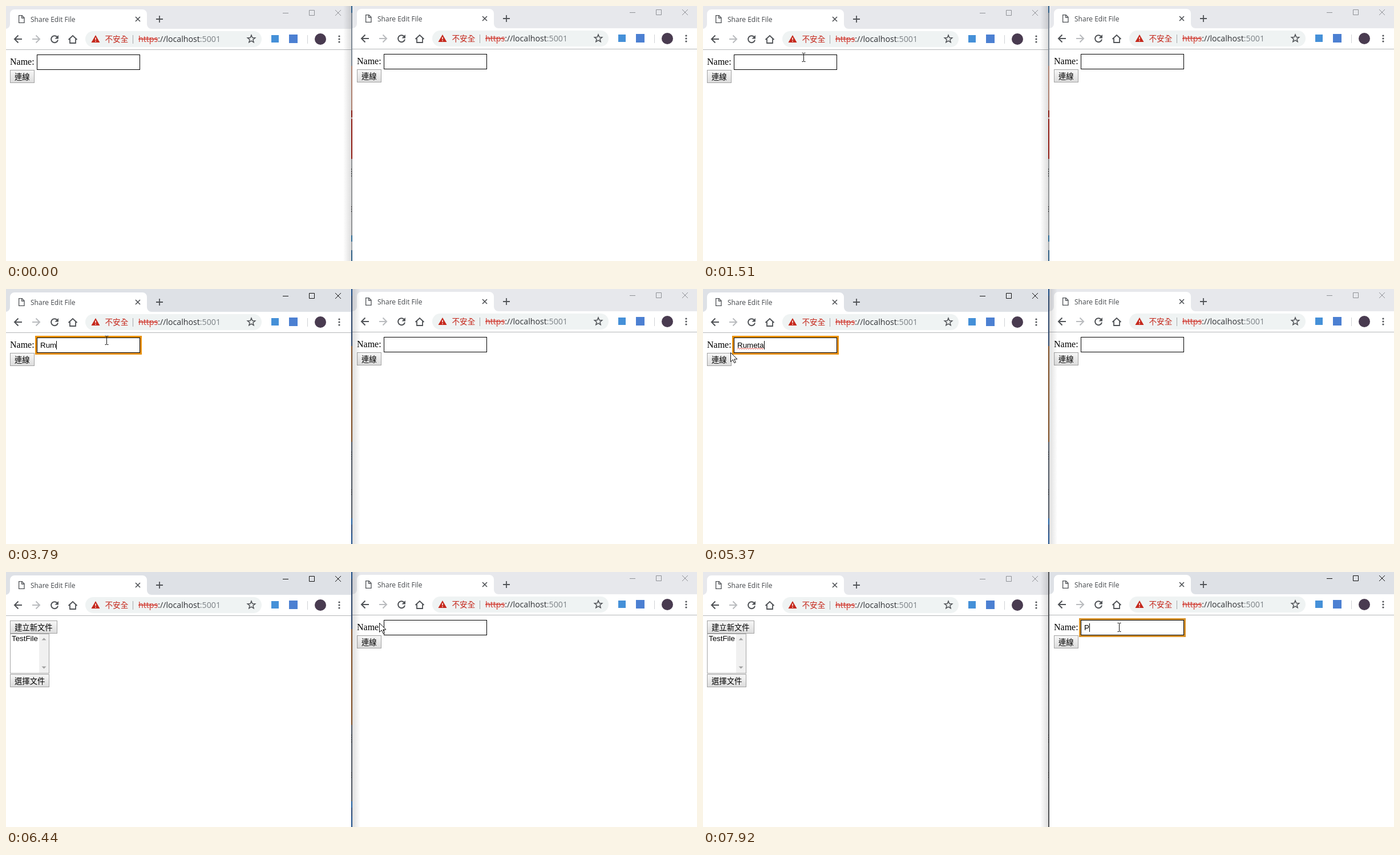
An HTML page for the animation above (8 s loop, 1211 by 447 pixels).

```html
<!DOCTYPE html>
<html lang="zh-Hant">
<head>
<meta charset="utf-8">
<title>Share Edit File</title>
<style>
html, body { margin: 0; width: 100%; height: 100%; overflow: hidden; background: #fff; }
svg { display: block; }
.win { --strip: #e7e8ec; --ctl: #8f9196; }
.win.active { --strip: #dee1e6; --ctl: #111; }
.line { fill: none; stroke: #505357; stroke-width: 2; }
.ui { font-family: "Open Sans", "Noto Sans", sans-serif; }
.cjk { font-family: "Noto Sans CJK TC", "Noto Sans CJK JP", "Noto Sans CJK", sans-serif; font-size: 13.333px; }
.form { font-family: "Liberation Sans", "Noto Sans CJK TC", "Noto Sans CJK JP", Arial, sans-serif; font-size: 13.333px; }
.btn { fill: url(#face); stroke: #a2a2a2; }
</style>
</head>
<body>
<svg width="1211" height="447" viewBox="0 0 1211 447">
  <defs>
    <linearGradient id="face" x2="0" y2="1">
      <stop stop-color="#f7f7f7"/><stop offset="1" stop-color="#dcdcdc"/>
    </linearGradient>
    <linearGradient id="shade">
      <stop stop-color="#000" stop-opacity="0"/><stop offset="1" stop-color="#000" stop-opacity=".13"/>
    </linearGradient>

    <g id="browser">
      <path d="M-1 0H604V449H-1z" fill="#fff"/>
      <path d="M-1 0H605V40H-1z" fill="var(--strip)"/>
      <path d="M-1 40a8 8 0 0 0 8-8V14a8 8 0 0 1 8-8H239a8 8 0 0 1 8 8V32a8 8 0 0 0 8 8z" fill="#fff"/>
      <path d="M-1 40H605V76H-1z" fill="#fff"/>
      <path d="M-1 76.5H605" stroke="#b4b6b9"/>
      <path class="line" style="stroke-width:1.3" d="M22.6 16.6h5.4l4 4v8.8h-9.4zM27.6 16.6v4.4h4.4"/>
      <text class="ui" x="43" y="28" font-size="12" fill="#45484c">Share Edit File</text>
      <path class="line" style="stroke-width:1.7" d="M227 19l8 8m0-8l-8 8"/>
      <path class="line" style="stroke-width:1.8" d="M263 23h12M269 17v12"/>
      <g fill="none" stroke="var(--ctl)">
        <path d="M485 12.5h10M531.5 7.5h9v9h-9zM577 7l10 10m0-10l-10 10"/>
      </g>
      <path class="line" d="M28 58H15M21.5 51.5L15 58l6.5 6.5"/>
      <path class="line" style="stroke:#b9bbbe" d="M46 58h13M52.500 51.500L59 58l-6.500 6.500"/>
      <path class="line" d="M89.500 54A6 6 0 1 0 91 59.500"/>
      <path fill="#505357" d="M92 51v6.500h-6.500z"/>
      <path class="line" style="stroke-width:1.800" d="M109.500 59L117 52l7.500 7M112 57.500V65h10v-7.500"/>
      <rect x="139" y="44" width="309" height="28" rx="14" fill="#eff3f3"/>
      <path fill="#c5281c" d="M157 51l7.500 13h-15z"/>
      <path stroke="#fff" stroke-width="1.500" d="M157 55.500v4M157 61v1.500"/>
      <text class="cjk" x="173.500" y="63" style="font-size:13.600px" font-weight="300" fill="#c5281c">不安全</text>
      <path stroke="#a5a8ab" d="M222.500 51v15"/>
      <text class="ui" x="232" y="63" font-size="14.200" fill="#303236"><tspan fill="#d0342a" text-decoration="line-through">https</tspan>://localhost<tspan fill="#7b8085">:5001</tspan></text>
      <path class="line" style="stroke-width:1.500" d="M430 51l1.800 4.600 4.900.3-3.800 3.100 1.200 4.700-4.100-2.600-4.100 2.600 1.200-4.700-3.800-3.100 4.900-.3z"/>
      <rect x="465" y="51" width="13" height="13" fill="#4590d8"/>
      <rect x="496" y="50" width="15" height="15" fill="#4c80d2"/>
      <path stroke="#cfd2d5" d="M528.500 51v15"/>
      <circle cx="551" cy="58" r="10" fill="#493b50"/>
      <g fill="#505357">
        <circle cx="584" cy="53" r="1.600"/><circle cx="584" cy="58" r="1.600"/><circle cx="584" cy="63" r="1.600"/>
      </g>
    </g>

    <g id="login">
      <text x="7" y="103" font-family="Liberation Serif, Times, serif" font-size="16">Name:</text>
      <rect x="54.500" y="85.500" width="180" height="26" fill="#fff" stroke="#000"/>
      <rect class="btn" x="7.500" y="112.500" width="42" height="22"/>
      <text class="cjk" x="15" y="128.500">連線</text>
    </g>
  </defs>

  <use id="winL" class="win" href="#browser"/>
  <use id="winR" class="win" href="#browser" x="608" y="-1"/>

  <g id="files">
    <rect class="btn" x="7.500" y="85.500" width="82" height="22"/>
    <text class="cjk" x="15" y="101.500">建立新文件</text>
    <rect x="7.500" y="108.500" width="68" height="69" fill="#fff" stroke="#a5a5a5"/>
    <path fill="#f0f0f0" d="M58 109h17v68H58z"/>
    <path fill="#a0a0a0" d="M62.500 119.500h8l-4-4zM62.500 165.500h8l-4 4z"/>
    <text class="form" x="10" y="121">TestFile</text>
    <rect class="btn" x="7.500" y="179.500" width="68" height="22"/>
    <text class="cjk" x="15" y="195.500">選擇文件</text>
  </g>

  <g id="loginL">
    <use href="#login"/>
    <rect id="press" x="7.500" y="112.500" width="42" height="22" fill="#000" fill-opacity=".08" stroke="#888"/>
    <rect class="ring" x="52.500" y="83.500" width="184" height="30" fill="none" stroke="#e8910c" stroke-width="3"/>
    <text class="form" x="60" y="103"></text>
    <rect class="caret" y="91" width="1" height="15"/>
    <path id="compose" d="M60 106.500H84" stroke="#333" stroke-dasharray="2 1"/>
    <path id="wavy" fill="none" stroke="#e23b30"/>
  </g>
  <g id="loginR" transform="translate(608 -1)">
    <use href="#login"/>
    <rect class="ring" x="52.500" y="83.500" width="184" height="30" fill="none" stroke="#d9932b" stroke-width="3"/>
    <text class="form" x="60" y="103"></text>
    <rect class="caret" y="91" width="1" height="15"/>
  </g>

  <rect id="shadeL" x="591" width="14" height="447" fill="url(#shade)"/>
  <rect id="shadeR" x="-621" width="14" height="447" fill="url(#shade)" transform="scale(-1 1)"/>
  <g id="gap"></g>

  <circle id="click" r="12" fill="#fdf766" style="mix-blend-mode:multiply"/>
  <g id="cursor">
    <path id="arrow" d="M.5.5V16.500L4.300 12.900 6.900 18.700 9.300 17.600 6.800 12H12z" fill="#fff" stroke="#111"/>
    <path id="beam" d="M-3-7.500H-.5M.5-7.500H3M0-7V7M-3 7.500H-.5M.5 7.500H3" stroke="#111"/>
  </g>
</svg>
<script>
const $ = id => document.getElementById(id);
const show = (el, on) => el.setAttribute('visibility', on ? 'inherit' : 'hidden');
const LOOP = 8000;
const FOCUS_L = 1620, PRESS = 5600, CONNECT = 5830, FOCUS_R = 6950, ACTIVE_R = 7000;

// Field contents over time; "|" stands for a visible caret
const typedL = [
  [0, ''], [FOCUS_L, '|'], [2160, ''], [2260, 'R|'], [2770, 'Rㄧ|'], [3330, 'Rㄧ'], [3410, 'R|'],
  [3560, 'Ru|'], [3790, 'Rum|'], [4020, 'Rume|'], [4110, 'Rumet|'], [4200, 'Rumeta|'],
  [4760, 'Rumeta'], [5320, 'Rumeta|'], [PRESS, 'Rumeta']
];
const typedR = [[0, ''], [FOCUS_R, '|'], [7520, ''], [7920, 'P|']];

// Pointer path: time, x, y
const path = [
  [820, 1043, 436], [1000, 760, 322], [1250, 330, 150], [1400, 196, 98], [1500, 176.5, 90.5],
  [4900, 176.5, 90.5], [5370, 48, 111], [5580, 38, 114], [5810, 38, 114],
  [5960, 183, 110], [6530, 741.5, 85], [6720, 741.5, 85], [6810, 729.5, 97]
];
const clicks = [[FOCUS_L, 1750], [PRESS, 5680], [FOCUS_R, 7050]];

// Desktop seen between the windows: start y, colour
const gaps = [
  [[0, '#2f5f88'], [12, '#7d8894'], [105, '#ad8070'], [183, '#86180f'], [195, '#b79a94'], [198, '#8e1b12'],
   [268, '#8f9194'], [402, '#2d6a94'], [413, '#a2a6aa'], [428, '#2f5f85']],
  [[0, '#1d4c85'], [12, '#2c4568'], [100, '#7b4a22'], [268, '#4f5763'], [402, '#1f5fa0'], [413, '#2b4a78'], [428, '#1f4f8a']],
  [[0, '#4c4e51']]
].map(bands => bands.map(([y, c]) => `<rect x="605" y="${y}" width="2" height="${447 - y}" fill="${c}"/>`).join('')
  + '<path d="M605.5 285v14M605.5 351v10" stroke="#333" stroke-dasharray="2 2"/>');

const last = (list, t) => list.filter(e => e[0] <= t).pop()[1];

function pointer(t) {
  const i = path.findIndex(p => p[0] > t);
  if (i < 0) return path[path.length - 1].slice(1);
  if (!i) return path[0].slice(1);
  const a = path[i - 1], b = path[i], k = (t - a[0]) / (b[0] - a[0]);
  return [1, 2].map(n => a[n] + (b[n] - a[n]) * k);
}

function field(group, value, focused) {
  const text = group.querySelector('text'), caret = group.querySelector('.caret');
  text.textContent = value.replace('|', '');
  caret.setAttribute('x', Math.round(60 + text.getComputedTextLength()));
  show(caret, value.endsWith('|'));
  show(group.querySelector('.ring'), focused);
}

let gapState = -1;
function draw(t) {
  const login = t < CONNECT;
  $('winL').classList.toggle('active', t >= FOCUS_L && t < ACTIVE_R);
  $('winR').classList.toggle('active', t >= ACTIVE_R);
  show($('loginL'), login);
  show($('files'), !login);
  field($('loginL'), last(typedL, t), t >= FOCUS_L && t < PRESS);
  field($('loginR'), last(typedR, t), t >= FOCUS_R);
  show($('compose'), login && t >= 2770 && t < 3410);
  show($('wavy'), login && t >= 4940);
  show($('press'), login && t >= PRESS && t < 5680);

  const state = t < FOCUS_L ? 0 : t < FOCUS_R ? 1 : 2;
  if (state !== gapState) $('gap').innerHTML = gaps[gapState = state];
  show($('shadeL'), state !== 1);
  show($('shadeR'), state === 1);

  const [x, y] = pointer(t);
  const inside = (dx, dy) => x > 54 + dx && x < 235 + dx && y >= 85 + dy && y < 112 + dy;
  const beam = login && inside(0, 0) || inside(608, -1);
  const snap = v => beam ? Math.floor(v) + .5 : Math.round(v);
  $('cursor').setAttribute('transform', `translate(${snap(x)} ${beam ? Math.floor(y) : Math.round(y)})`);
  show($('cursor'), t >= 820);
  show($('beam'), t >= 820 && beam);
  show($('arrow'), t >= 820 && !beam);
  $('click').setAttribute('cx', x - 2);
  $('click').setAttribute('cy', y - 1);
  show($('click'), clicks.some(([a, b]) => t >= a && t < b));
}

$('wavy').setAttribute('d', 'M60 105.5' + 'l2-2 2 2'.repeat(11) + 'l2-2');

const start = performance.now();
function tick(now) {
  draw(Math.max(0, now - start) % LOOP);
  requestAnimationFrame(tick);
}
draw(0);
requestAnimationFrame(tick);
</script>
</body>
</html>
```
